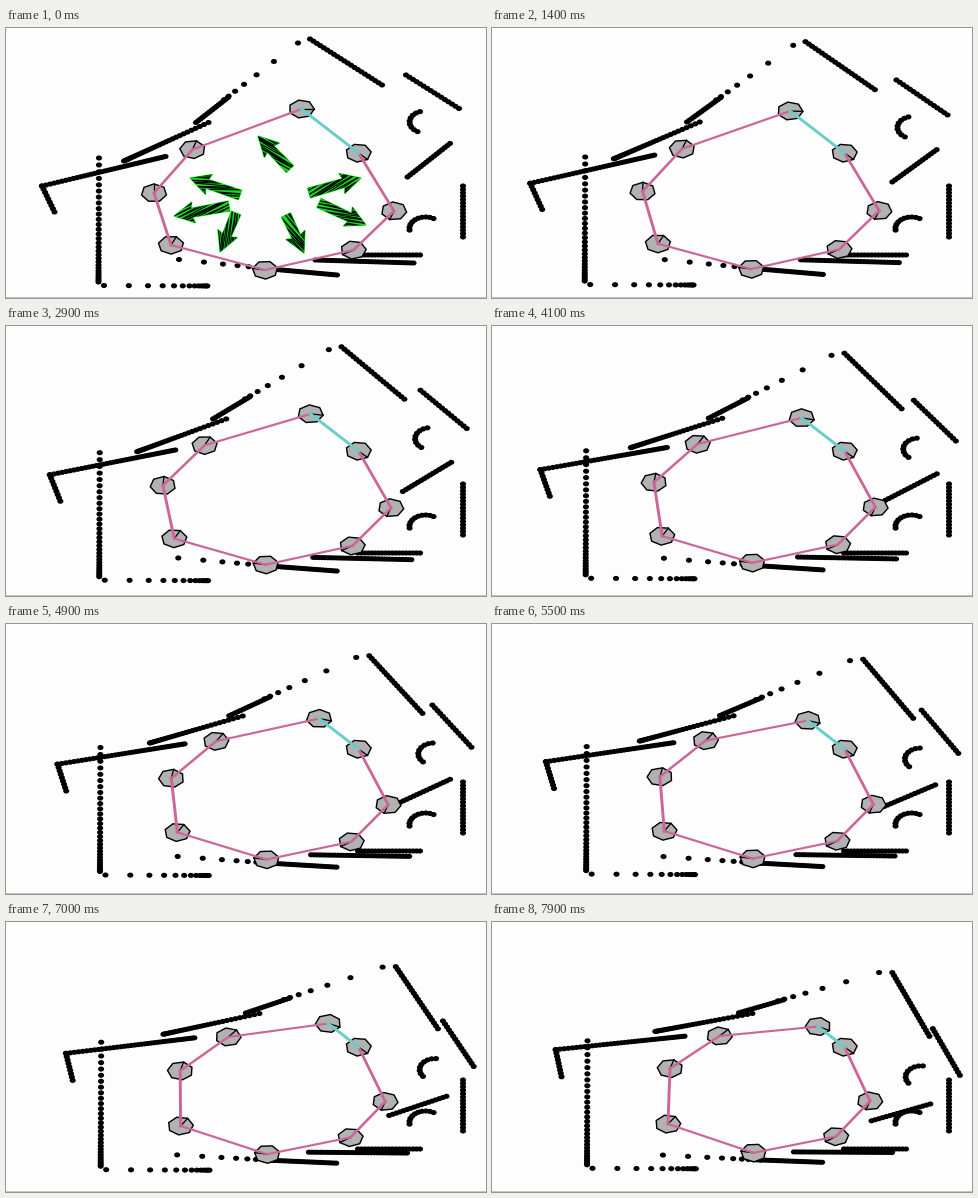
Animation, 480 px wide and 270 px high, one loop 8000 ms. Source, as a matplotlib script:

```python
import numpy as np
import matplotlib.pyplot as plt
from matplotlib.animation import FuncAnimation
from matplotlib.collections import EllipseCollection
from matplotlib.transforms import Affine2D

W, H, DPI = 480, 270, 100
PX = 72 / DPI            # points per pixel
STRETCH = 1.4            # the map is drawn wider than it is tall
FRAMES, HOLD = 80, 6
PINK, CYAN = "#cb6697", "#68cec8"

# name: start x, y, end x, y, turn, heading (degrees, clockwise)
POSES = {
    "b": (352.5, 125, 352.5, 125, 0, 45),
    "c": (388, 183, 378, 179, -2, 110),
    "d": (347.5, 222, 344, 214.5, -4.2, 150),
    "e": (259, 242, 261.5, 230.8, 0, 190),
    "f": (165, 217, 176, 202, 10.2, -65),
    "g": (148, 165, 178, 146.5, 18, -90),
    "h": (186.5, 121.5, 227.5, 114, 25.6, -72),
    "a": (295.5, 81, 326, 104.5, 26, 0),
}

ARROWS = [  # tail, tip
    (284, 141, 252, 108), (234, 167, 184, 150), (223, 178, 168, 188),
    (230, 185, 214, 224), (280, 187, 298, 225), (313, 175, 360, 197),
    (303, 165, 355, 150),
]


def wall(x0, y0, x1, y1, n, k=0.0):
    """Dots on a straight wall; k > 0 makes them sparser at the start."""
    u = np.linspace(0, 1, n)
    u = u + k * u * (1 - u)
    return np.column_stack([x0 + (x1 - x0) * u, y0 + (y1 - y0) * u])


def shrinking(x, y, dx, dy, ratio, n):
    """Dots whose gaps shrink by a constant ratio."""
    u = 1 - ratio ** np.arange(n)
    return np.column_stack([x + dx * u, y + dy * u])


def arc(cx, cy, r, a0, a1, n):
    a = np.radians(np.linspace(a0, a1, n))
    return np.column_stack([cx + STRETCH * r * np.cos(a), cy + r * np.sin(a)])


SCANS = {
    "a": [wall(400, 47, 453, 80.5, 16), wall(401.5, 149, 444, 115.5, 17),
          arc(419, 94, 11, 251, 119, 9)],
    "b": [wall(457, 158, 457, 209, 16), wall(352, 227, 414, 227, 19),
          arc(419.5, 200.5, 11.5, 172, 300, 10)],
    "c": [wall(309.5, 232, 407.5, 235, 34)],
    "d": [shrinking(173, 231.5, 106, 11, 0.765, 10),
          wall(270, 241.5, 331, 247, 24)],
    "e": [wall(93, 130, 92.5, 254, 29, 0.6),
          shrinking(98, 257.5, 108, 0.5, 0.77, 13)],
    "f": [wall(159.5, 128.5, 36, 158, 40, -0.3), wall(36, 158, 48.5, 184, 9)],
    "g": [wall(202.5, 94.5, 118, 133, 32, 0.65)],
    "h": [wall(304, 11, 376, 57, 22), wall(222, 69.5, 190, 94.5, 15),
          shrinking(292, 15, -86, 66, 0.72, 7)],
}


def place(name, pts, p):
    """Carry points fixed to a pose along with it, at progress p."""
    x0, y0, x1, y1, turn, _ = POSES[name]
    a = np.radians(turn * p)
    dx, dy = (pts[:, 0] - x0) / STRETCH, pts[:, 1] - y0
    x = x0 + (x1 - x0) * p + STRETCH * (dx * np.cos(a) - dy * np.sin(a))
    y = y0 + (y1 - y0) * p + dx * np.sin(a) + dy * np.cos(a)
    return np.column_stack([x, y])


def body(name):
    """Heptagon around a pose."""
    x, y, *_, heading = POSES[name]
    return arc(x, y, 9.1, heading, heading + 360, 8)


def along(ends, pts):
    """Map (along, across) offsets from an arrow's tail to the stage."""
    tail, tip = np.array(ends[:2]), np.array(ends[2:])
    d = (tip - tail) / np.hypot(*(tip - tail))
    return tail + np.asarray(pts) @ np.array([d, [-d[1], d[0]]])


def arrow_shape(ends):
    length = np.hypot(ends[2] - ends[0], ends[3] - ends[1])
    neck = length - 20
    return along(ends, [(0, -5), (neck + 2, -4.5), (neck, -10.5), (length, 0),
                        (neck, 10.5), (neck + 2, 4.5), (0, 5)])


def scribble(ends, rng):
    """Loose pen strokes running back and forth, slightly off the axis."""
    v = np.arange(-32, 32, 1.6)
    v = v + rng.uniform(-1, 1, len(v))
    side = np.where(np.arange(len(v)) % 2, 1, -1)
    return along(ends, np.column_stack([28 + 32 * side, v - 9 * side]))


fig = plt.figure(figsize=(W / DPI, H / DPI), dpi=DPI, facecolor="#fdfdfd")
ax = fig.add_axes([0, 0, 1, 1])
ax.axis("off")

ax.plot([0, W], [269, 269], color="#c4c4c4", lw=PX)
ax.plot([479.5, 479.5], [233.5, 238.5], color="#444444", lw=PX)

dots = EllipseCollection([6.1], [5.1], [0], units="xy", offsets=[(0, 0)],
                         offset_transform=ax.transData, fc="black", lw=0)
ax.add_collection(dots, autolim=False)

bodies, ticks = {}, {}
for name in POSES:
    bodies[name], = ax.fill(*body(name).T, fc="#b2b2b2", ec="black",
                            lw=1.4 * PX, zorder=3)
    ticks[name], = ax.plot([], [], color="black", lw=1.3 * PX, zorder=4)

names = list(POSES)
pairs = list(zip(names, names[1:] + names[:1]))
links = [ax.plot([], [], color=CYAN if pair == ("a", "b") else PINK,
                 zorder=5)[0] for pair in pairs]

zoom = Affine2D()
rng = np.random.default_rng(4)
arrow_parts = []
for ends in ARROWS:
    trans = zoom + ax.transData
    fill, = ax.fill(*arrow_shape(ends).T, fc="#12dc1e", ec="#12dc1e",
                    lw=1.2 * PX, transform=trans, zorder=6)
    pen, = ax.plot(*scribble(ends, rng).T, color="black", lw=1.1 * PX,
                   transform=trans, zorder=7)
    pen.set_clip_path(fill)
    arrow_parts += [fill, pen]
ax.set_xlim(0, W)
ax.set_ylim(H, 0)


def draw_arrows(frame):
    # the arrows fly outwards while fading
    scale = 1 + 0.08 * min(frame, 4)
    zoom.clear().translate(-267, -166).scale(scale).translate(267, 166)
    for part in arrow_parts:
        part.set_visible(frame < 4)
        part.set_alpha(max(0, 1 - frame / 4))


def progress(frame):
    """Steady motion after a soft start."""
    step, last = max(0, frame - HOLD), FRAMES - 1 - HOLD
    return (step - 2 * (1 - np.exp(-step / 3))) / (last - 2)


def update(frame):
    p = progress(frame)
    dots.set_offsets(np.vstack([place(k, part, p)
                                for k in SCANS for part in SCANS[k]]))

    centre = {}
    for name in names:
        x0, y0 = POSES[name][:2]
        centre[name] = place(name, np.array([[x0, y0]]), p)[0]
        outline = place(name, body(name), p)
        bodies[name].set_xy(outline)
        ticks[name].set_data(*np.array([centre[name], outline[0]]).T)

    for link, (i, j) in zip(links, pairs):
        (xa, ya), (xb, yb) = centre[i], centre[j]
        link.set_data([xa, xb], [ya, yb])
        dx, dy = xb - xa, yb - ya
        base = 2.5 if link.get_color() == CYAN else 2.1
        thick = base * np.hypot(dx, dy * STRETCH) / np.hypot(dx, dy)
        link.set_linewidth(thick * PX)

    draw_arrows(frame)
    return [dots, *bodies.values(), *ticks.values(), *links, *arrow_parts]


anim = FuncAnimation(fig, update, frames=FRAMES, interval=100,
                     repeat=True, repeat_delay=0, blit=False)
plt.show()
```
